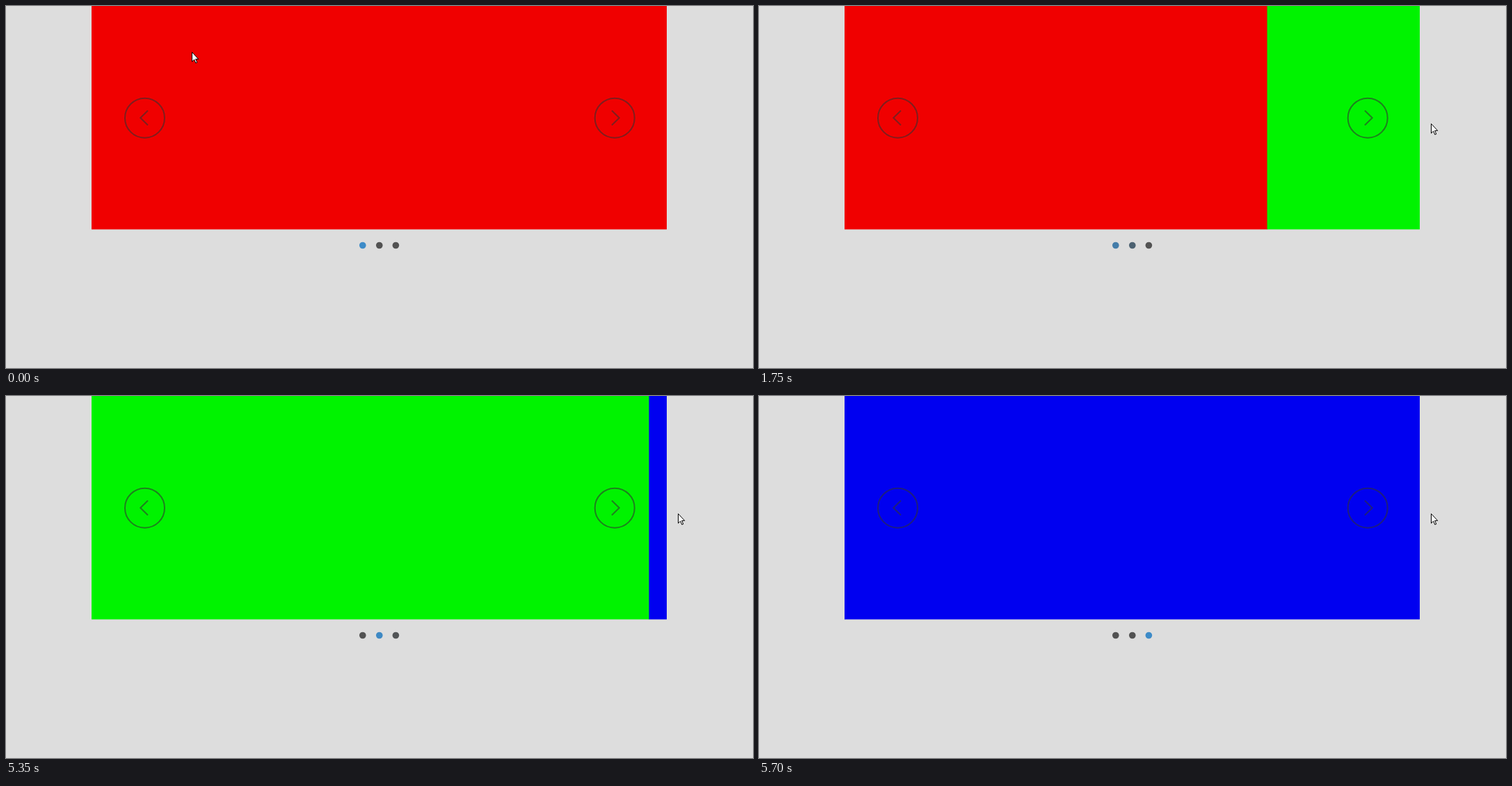
These frames come from a looping animation (1074x521 px, 8 s). An HTML page:

```html
<!DOCTYPE html>
<html lang="en">
<head>
<meta charset="utf-8">
<title>Carousel</title>
<style>
  html, body { margin: 0; width: 100%; height: 100%; overflow: hidden; background: #ddd; }
  svg { display: block; width: 1074px; height: 521px; }
</style>
</head>
<body>
<svg viewBox="0 0 1074 521">
  <defs>
    <clipPath id="viewport"><rect x="123" width="827" height="321.5"/></clipPath>
  </defs>
  <rect width="1074" height="521" fill="#ddd"/>
  <g clip-path="url(#viewport)">
    <g id="track">
      <rect x="123" width="827.5" height="322" fill="#f00000"/>
      <rect x="950" width="827.5" height="322" fill="#00f300"/>
      <rect x="1777" width="827" height="322" fill="#0000f0"/>
    </g>
  </g>
  <g fill="none" stroke="#333" stroke-width="2" opacity=".6">
    <circle cx="199.5" cy="161.2" r="28.5"/>
    <path d="M204 150.5L193.3 161L204 171.5"/>
    <circle cx="875.2" cy="161.2" r="28.5"/>
    <path d="M871 150.5L881.7 161L871 171.5"/>
  </g>
  <g id="dots">
    <circle cx="512.8" cy="344.5" r="4.8"/>
    <circle cx="536.8" cy="344.5" r="4.8"/>
    <circle cx="560.4" cy="344.5" r="4.8"/>
  </g>
  <path id="cursor" d="M.5 .5V14.1L3.6 11.1L5.8 16.1L7.8 15.2L5.6 10.4H9.7Z"
        fill="#fff" stroke="#000" stroke-linejoin="round"/>
</svg>
<script>
const LOOP = 8000, STEP = 50, SLIDE_WIDTH = 827, SLIDE_TIME = 350;
const slideStarts = [1634.6, 5309];
const cursorMoves = [
  { from: 0, to: 350, x: 913, y: 164 },
  { from: 450, to: 600, x: 935, y: 167 },
  { from: 700, to: 1100, x: 966, y: 169 },
];
const idleColor = [82, 82, 82], activeColor = [61, 139, 200];

const track = document.getElementById('track');
const dots = [...document.getElementById('dots').children];
const cursor = document.getElementById('cursor');

const clamp = v => Math.min(1, Math.max(0, v));
const mix = (a, b, p) => a + (b - a) * p;
const smooth = s => s * s * (3 - 2 * s);

// cubic-bezier(.4, 0, .5, 1), solved by bisection
function ease(x) {
  if (x <= 0 || x >= 1) return clamp(x);
  let low = 0, high = 1;
  for (let i = 0; i < 24; i++) {
    const s = (low + high) / 2, r = 1 - s;
    if (1.2 * s * r * r + 1.5 * s * s * r + s * s * s < x) low = s;
    else high = s;
  }
  return smooth(low);
}

function render(t) {
  const position = slideStarts.reduce((sum, start) => sum + ease((t - start) / SLIDE_TIME), 0);
  track.setAttribute('transform', `translate(${-position * SLIDE_WIDTH} 0)`);

  dots.forEach((dot, i) => {
    const active = clamp(1 - Math.abs(position - i));
    const color = idleColor.map((c, k) => Math.round(mix(c, activeColor[k], active)));
    dot.setAttribute('fill', `rgb(${color})`);
  });

  let x = 267, y = 66;
  for (const move of cursorMoves) {
    const p = smooth(clamp((t - move.from) / (move.to - move.from)));
    x = mix(x, move.x, p);
    y = mix(y, move.y, p);
  }
  cursor.setAttribute('transform', `translate(${Math.round(x)} ${Math.round(y)})`);
}

const origin = performance.now();
function tick() {
  const t = (performance.now() - origin) % LOOP;
  render(Math.floor(t / STEP) * STEP);
  requestAnimationFrame(tick);
}
tick();
</script>
</body>
</html>
```
